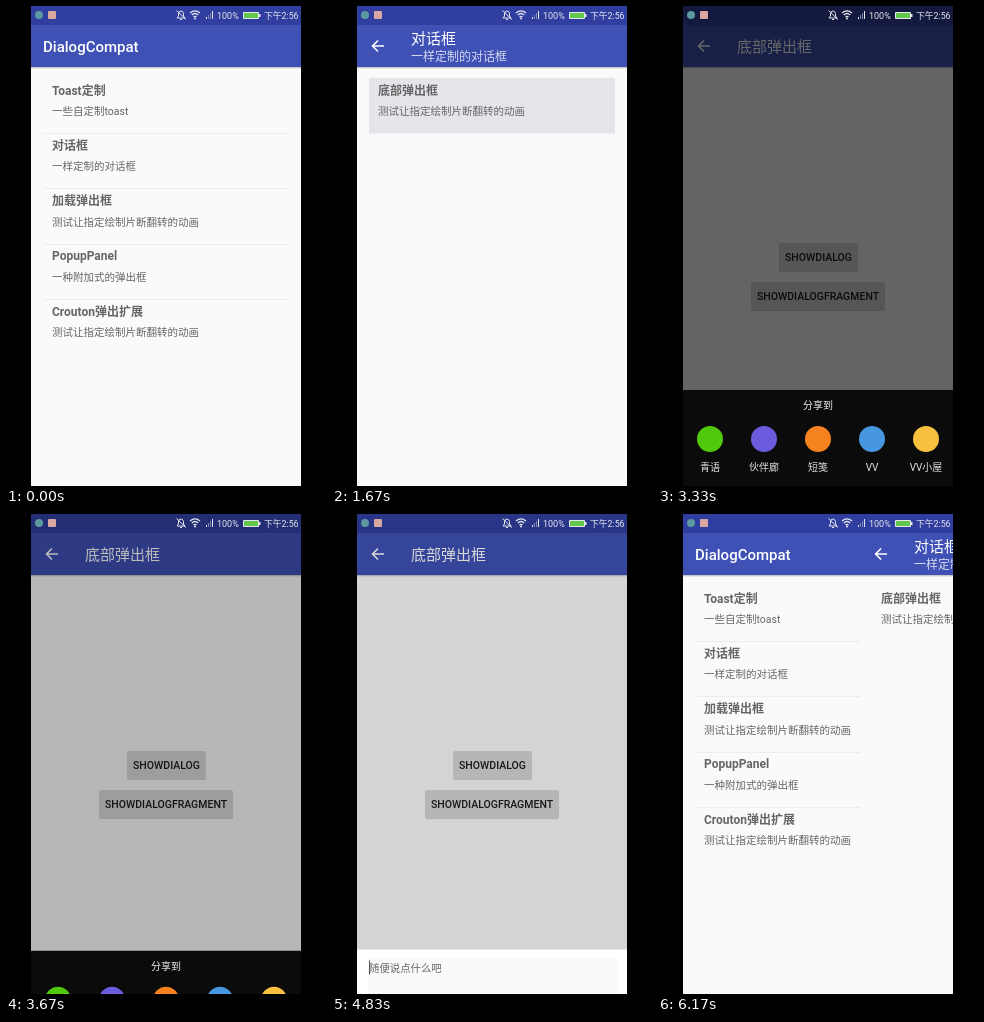
Write an HTML page with a canvas that moves like this. It is 320 by 480 pixels and loops after 6.34 s.

```html
<!DOCTYPE html>
<html lang="zh-CN">
<head>
<meta charset="utf-8">
<style>
html, body { margin: 0; width: 100%; height: 100%; overflow: hidden; background: #000; }
canvas { display: block; }
</style>
</head>
<body>
<canvas id="stage" width="320" height="480"></canvas>
<script>
const c = document.getElementById('stage').getContext('2d');
const FONT = 'Roboto, "Noto Sans CJK SC", "Noto Sans CJK", sans-serif';
const LOOP = 6340, LEFT = 25, WIDTH = 270;
const GREY = '#666';

const MENU = [
  ['Toast定制', '一些自定制toast'],
  ['对话框', '一样定制的对话框'],
  ['加载弹出框', '测试让指定绘制片断翻转的动画'],
  ['PopupPanel', '一种附加式的弹出框'],
  ['Crouton弹出扩展', '测试让指定绘制片断翻转的动画']
];
const DIALOGS = [['底部弹出框', '测试让指定绘制片断翻转的动画']];
const TARGETS = [
  ['青语', '#50c80c'], ['伙伴廊', '#6a5cdc'], ['短笺', '#f5821e'],
  ['VV', '#4696e0'], ['VV小屋', '#f8c03c']
];

function rect(x, y, w, h, color, r = 0) {
  c.fillStyle = color;
  c.beginPath();
  c.roundRect(x, y, w, h, r);
  c.fill();
}

function disc(x, y, r, color) {
  c.fillStyle = color;
  c.beginPath();
  c.arc(x, y, r, 0, 7);
  c.fill();
}

function text(s, x, y, size, color, weight = 400, align = 'left') {
  c.font = `${weight} ${size}px ${FONT}`;
  c.fillStyle = color;
  c.textAlign = align;
  c.fillText(s, x, y);
}

function path(d, color, width) {
  const p = new Path2D(d);
  if (width) {
    c.strokeStyle = color;
    c.lineWidth = width;
    c.stroke(p);
  } else {
    c.fillStyle = color;
    c.fill(p);
  }
}

function layer(draw, { x = 0, y = 0, alpha = 1 }) {
  c.save();
  c.globalAlpha = alpha;
  c.translate(x, y);
  draw();
  c.restore();
}

function frame() {
  rect(LEFT, 61, WIDTH, 419, '#fafafa');
  rect(LEFT, 19, WIDTH, 42, '#3f51b5');
  rect(LEFT, 61, WIDTH, 1, 'rgba(0,0,0,.2)');
  rect(LEFT, 62, WIDTH, 1, 'rgba(0,0,0,.07)');
}

function backArrow() {
  path('M52 40H41M46 34.5L40.5 40L46 45.5', '#fff', 1.6);
}

function list(rows, pressed) {
  rows.forEach(([title, note], i) => {
    const y = i * 55.25;
    if (i === pressed) rect(37, 72 + y, 246, 55.5, '#e4e5ea');
    if (i < rows.length - 1) rect(37, Math.round(127 + y), 246, 1, '#ececea');
    text(title, 46, 88.5 + y, 12, GREY, 700);
    text(note, 46, 109 + y, 10.5, GREY);
  });
}

function menuScreen(pressed) {
  frame();
  text('DialogCompat', 37, 45.5, 15, '#fff', 500);
  list(MENU, pressed);
}

function dialogScreen(pressed) {
  frame();
  backArrow();
  text('对话框', 79, 38, 15, '#fff');
  text('一样定制的对话框', 79, 54.5, 12, '#d4d8ee');
  list(DIALOGS, pressed);
}

function button(label, x, y, w, pressed) {
  rect(x, y + 1, w, 28, 'rgba(0,0,0,.16)', 2);
  rect(x, y, w, 28, pressed ? '#b8b9b9' : '#d6d7d7', 2);
  text(label, x + w / 2, y + 18, 10.5, '#1c1c1c', 500, 'center');
}

function formScreen(pressed) {
  frame();
  backArrow();
  text('底部弹出框', 79, 45.5, 15, '#fff');
  button('SHOWDIALOG', 121, 237, 79, pressed === 0);
  button('SHOWDIALOGFRAGMENT', 93, 276, 134, pressed === 1);
}

function statusIcons() {
  const ink = '#e4e6ee';
  disc(33, 9, 4, '#5c9aa0');
  rect(42, 5, 8, 8, '#d8a8a0', 1);
  path('M171 12H179L177.5 10V7.5Q177 5 175 5Q172.5 5 172.5 8V10ZM174 13.5H176M170.5 4.5L180 13.5', ink, 1);
  path('M184 7Q189 2.6 194 7M185.8 9Q189 6 192.2 9M187.5 11Q189 9.6 190.5 11', ink, 1.2);
  disc(189, 12.5, 1, ink);
  for (let i = 0; i < 4; i++) rect(200 + i * 2, 11 - i * 2, 1, 2 + i * 2, i < 1 || i > 2 ? ink : '#7c84b0');
  text('100%', 211, 13, 9, ink);
  path('M237.5 6.5H252.5V12.5H237.5Z', ink, 1);
  rect(238, 7, 14, 5, '#62c84c');
  rect(253, 8, 1.5, 3, ink);
  text('下午2:56', 258, 13, 8.8, ink);
}

function shareSheet() {
  rect(LEFT, 384, WIDTH, 96, '#0b0b0b');
  text('分享到', 160, 403, 10, '#f4f4f4', 400, 'center');
  TARGETS.forEach(([name, color], i) => {
    const x = 52 + i * 54;
    disc(x, 433, 13, color);
    text(name, x, 464.5, 10, '#e4e4e4', 400, 'center');
  });
}

function noteSheet() {
  rect(LEFT, 211, WIDTH, 111, '#fff');
  rect(36, 219, 250, 66, '#f8f9fa');
  rect(37, 222, 1, 14, '#555');
  text('随便说点什么吧', 37, 233, 10.4, GREY);
  const line = '#707060';
  path('M38 298H52V308H38ZM40 306L44 302L47 305L49 303L51 306M70 298H84V308H70ZM72 306L76 302L79 305L81 303L83 306', line, 1);
  c.strokeStyle = line;
  c.beginPath();
  c.roundRect(248, 293, 35, 21, 3);
  c.stroke();
  text('发送', 265.5, 307.5, 10, line, 400, 'center');
}

function key(label, x, y, w, hint, dark) {
  rect(x, y + 1, w, 36, '#aab0b4', 3);
  rect(x, y, w, 35, dark ? '#a8b1b6' : '#fcfdff', 3);
  text(label, x + w / 2, y + 24, dark ? 14 : 16, dark ? '#fff' : '#444', 400, 'center');
  if (hint) text(hint, x + w / 2, y + 8.5, 7, '#94989c', 400, 'center');
}

function keyRow(letters, hints, x, y) {
  [...letters].forEach((letter, i) => key(letter, x + i * 26.5, y, 22.5, hints[i]));
}

function imeTools() {
  const ink = '#6c7074';
  for (let i = 0; i < 4; i++) rect(41 + i % 2 * 7.5, 288 + (i >> 1) * 7, 6, 5.5, ink, 1);
  disc(93, 294, 7, ink);
  disc(90.5, 292, 1.2, '#fff');
  disc(95.5, 292, 1.2, '#fff');
  path('M89 296H97Q93 302 89 296', '#fff');
  rect(131, 288, 15, 12, ink, 1.5);
  for (let i = 0; i < 8; i++) rect(133 + i % 4 * 3, 290.5 + (i >> 2) * 3, 1.5, 1.5, '#fff');
  rect(135, 297, 7, 1.3, '#fff');
  path('M184 289V299M181.5 288.5H186.5M181.5 299.5H186.5', ink, 1.3);
  path('M180 291V297L176 294ZM188 291V297L192 294Z', ink);
  c.font = '15px "DejaVu Sans", sans-serif';
  c.fillStyle = ink;
  c.textAlign = 'center';
  c.fillText('⌘', 229.5, 299);
  path('M268.5 291H279.5L274 297Z', ink);
}

function keyboard() {
  rect(LEFT, 277, WIDTH, 38, '#fff');
  rect(LEFT, 277, WIDTH, 1, '#eceef0');
  imeTools();
  rect(LEFT, 315, WIDTH, 165, '#d3d8dc');
  keyRow('qwertyuiop', '1234567890', 29, 316);
  keyRow('asdfghjkl', '~!@#%\'&*?', 42.5, 359);
  key('拼', 29, 401, 36, '', true);
  keyRow('zxcvbnm', '()-_:;/', 69, 401);
  key('', 252, 401, 39, '', true);
  path('M263 419L268 413.5H279V424.5H268Z', '#fff');
  path('M270 416.5L275 421.5M275 416.5L270 421.5', '#8c9498', 1.3);
  key('符', 29, 444, 36, '', true);
  key('123', 69, 444, 28, '', true);
  key(',', 101, 444, 22);
  key('', 127, 444, 66);
  rect(158, 451, 4, 8, '#80868a', 2);
  path('M156 456Q156 461 160 461Q164 461 164 456M160 461V464', '#80868a', 1);
  path('M150 466V470H170V466', '#505458', 2);
  key('｡', 197, 444, 22);
  key('', 223, 444, 27, '', true);
  text('中', 230, 466, 11, '#fff', 400, 'center');
  text('/英', 241, 466, 8, '#f0f2f4', 400, 'center');
  key('', 253, 444, 38, '', true);
  path('M280 457V463H265', '#fff', 2.2);
  path('M268 458V468L261 463Z', '#fff');
}

const progress = (k, from, steps) => Math.min(1, Math.max(0, (k - from) / steps));
const slideIn = (k, from, steps) => WIDTH * (1 - progress(k, from, steps)) ** 2;
const slideOut = (k, from, steps) => WIDTH * progress(k, from, steps) ** 1.04;

function dim(alpha) {
  rect(LEFT, 0, WIDTH, 480, `rgba(0,0,0,${alpha})`);
}

function draw(now) {
  const k = Math.floor((now % LOOP + 8) * 0.006);

  c.fillStyle = '#000';
  c.fillRect(0, 0, 320, 480);
  c.save();
  c.beginPath();
  c.rect(LEFT, 0, WIDTH, 480);
  c.clip();

  menuScreen(k === 3 || k === 4 ? 1 : -1);
  const dialogX = slideIn(k, 3, 4) + slideOut(k, 35, 3);
  if (dialogX < WIDTH) layer(() => dialogScreen(k === 10 || k === 11 ? 0 : -1), { x: dialogX });
  const formX = slideIn(k, 11, 3) + slideOut(k, 31, 3);
  const pressed = k === 15 || k === 16 ? 0 : k === 23 ? 1 : -1;
  if (formX < WIDTH) layer(() => formScreen(pressed), { x: formX });
  rect(LEFT, 0, WIDTH, 19, '#303f9f');

  const share = [0.3, 0.7, 0.95, 1, 1, 0.45][k - 17];
  if (share) {
    dim(0.6 * share);
    layer(shareSheet, { y: 96 * (1 - share) });
  }

  const note = [0.5, 1, 1, 1, 1, 0.4][k - 24];
  if (note) {
    dim(0.38 * note);
    const settled = k > 25 && k < 29;
    const y = note < 1 ? 158 + 111 * (1 - note) : settled ? -45 : 0;
    layer(noteSheet, { y });
    if (note === 1) layer(keyboard, { alpha: settled ? 1 : 0.86 });
  }

  statusIcons();
  c.restore();
}

function tick() {
  draw(performance.now());
  requestAnimationFrame(tick);
}
tick();
</script>
</body>
</html>
```
